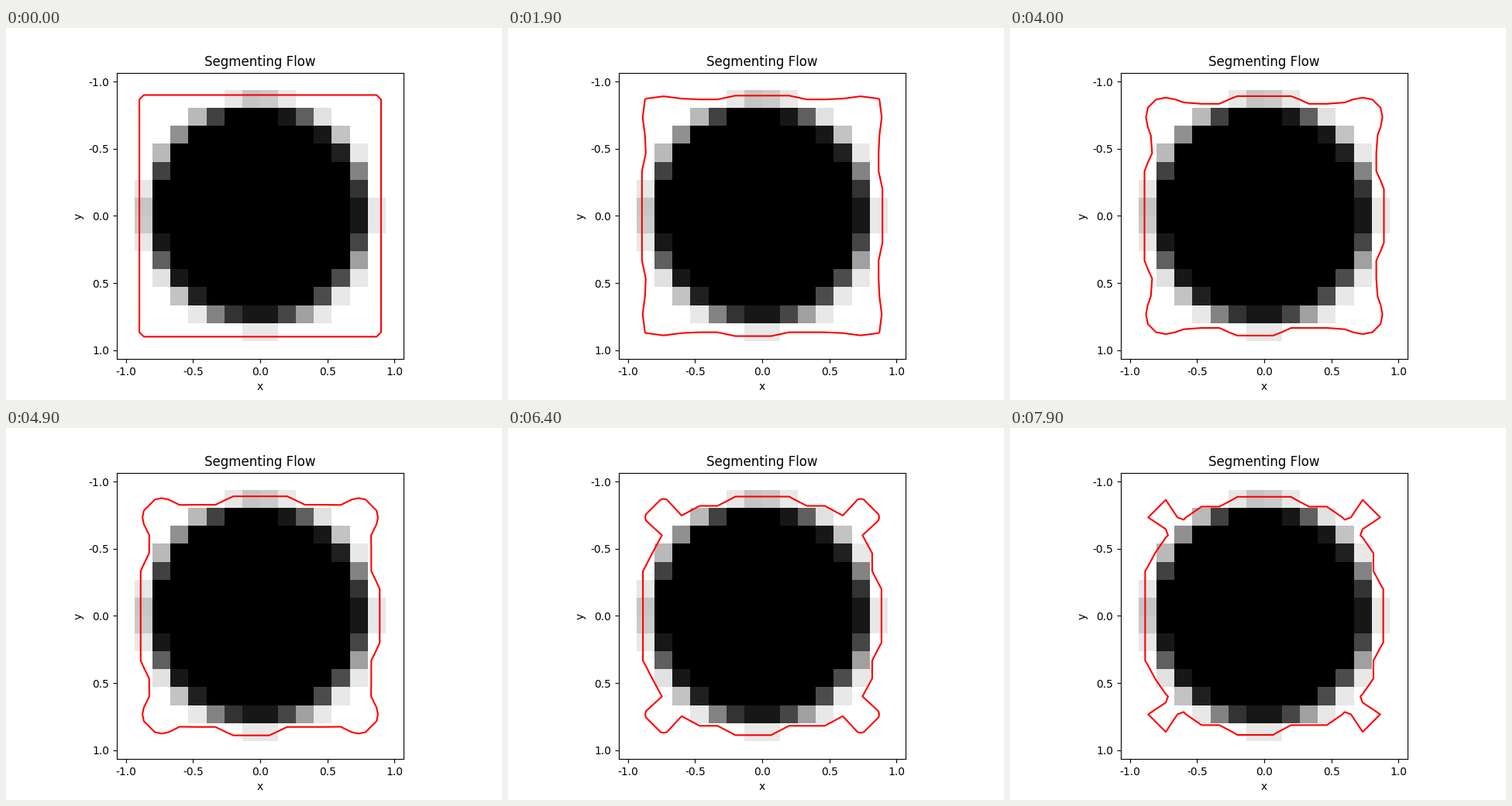
A matplotlib script for the animation above (8000 ms loop, 640 by 480 pixels).

```python
import numpy as np
import matplotlib.pyplot as plt
from matplotlib.animation import FuncAnimation

plt.rcParams["axes.unicode_minus"] = False

N = 16
FRAMES, INTERVAL = 80, 100
AXIS = np.linspace(-1, 1, N)

# Level-set values: outside, on the first ring inside, and deeper inside
OUTER, RING, DEEP = 0.75, -0.25, -0.6


def disc_image(center=7.36, radius=6.1):
    """Dark disc with a soft rim about one cell wide."""
    i, j = np.indices((N, N))
    d = np.hypot(i - center, j - center) - radius
    rim = np.clip(0.5 + d, 0.09, 0.91)
    return np.where(d < -0.54, 0, np.where(d > 0.65, 1, rim))


def settle(t, rise, tau):
    return RING + rise * (1 - np.exp(-t / tau))


def smoothstep(t, start, end):
    s = np.clip((t - start) / (end - start), 0, 1)
    return s * s * (3 - 2 * s)


def level_set(t):
    phi = np.full((N, N), OUTER)
    phi[1:-1, 1:-1] = DEEP

    # The ring shrinks fast along the sides and sticks where it meets the disc
    top, bottom, left, right = phi[1], phi[-2], phi[:, 1], phi[:, -2]
    stuck = [(top, 6, 10), (bottom, 6, 9), (left, 5, 11), (right, 6, 10)]
    for side, a, b in stuck:
        side[4:-4] = settle(t, 0.85, 5.5)
        side[[1, 3, -4, -2]] = settle(t, 0.42, 2.7)
        side[[2, -3]] = settle(t, 0.38, 7.2)
        side[a:b] = settle(t, 0.16, 6)

    # Later the front cuts in behind the four corners
    cut = smoothstep(t, 1.5, 8)
    near, far = [2, -3], [3, -4]
    phi[np.ix_(near, near)] = DEEP + 0.43 * cut
    phi[np.ix_(near, far)] = phi[np.ix_(far, near)] = DEEP + 0.69 * cut
    return phi


fig, ax = plt.subplots(figsize=(6.4, 4.8), dpi=100)
edge = 1 + 1 / (N - 1)
ax.imshow(disc_image(), cmap="gray", vmin=0, vmax=1,
          extent=(-edge, edge, edge, -edge))
ticks = np.linspace(-1, 1, 5)
ax.set(title="Segmenting Flow", xlabel="x", ylabel="y", xticks=ticks, yticks=ticks,
       xlim=(-edge, edge), ylim=(edge, -edge))
ax.autoscale(False)

curves = []


def update(i):
    while curves:
        curves.pop().remove()
    t = i * INTERVAL / 1000
    curves.append(ax.contour(AXIS, AXIS, level_set(t), levels=[0],
                             colors="red", linewidths=1.5))
    return curves


anim = FuncAnimation(fig, update, frames=FRAMES, interval=INTERVAL,
                     init_func=lambda: [], repeat=True, repeat_delay=0)
plt.show()
```
